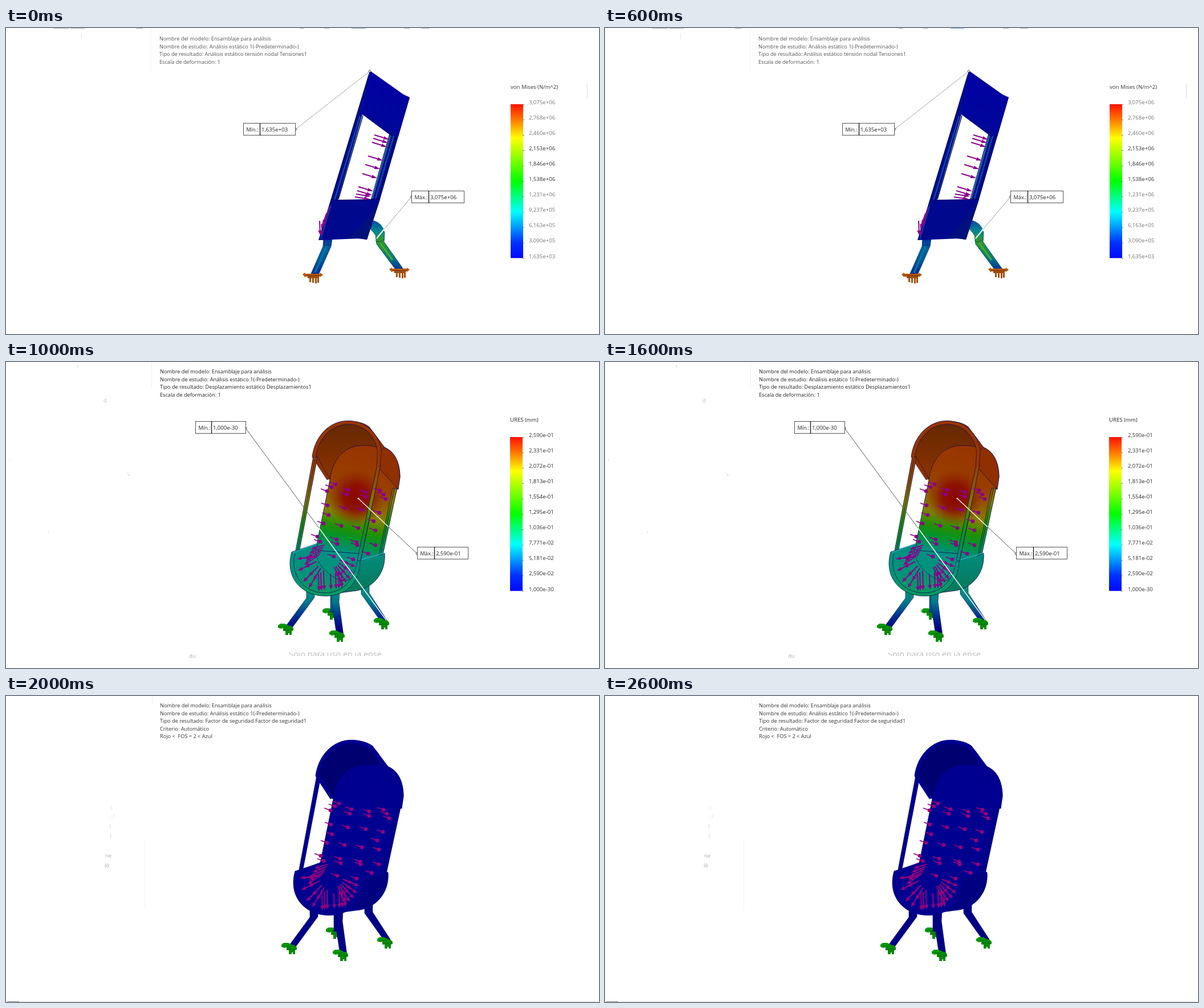
Animation of 1040 by 538 pixels, one loop 3 s. Source, as an HTML page:

```html
<!DOCTYPE html>
<html lang="es">
<head>
<meta charset="utf-8">
<title>Análisis estático</title>
<style>
  html, body { margin: 0; width: 100%; height: 100%; overflow: hidden; background: #fff; }
  svg { display: block; width: 1040px; height: 538px; color: #8c008c; }
  text { font-family: "Open Sans", "Noto Sans", sans-serif; font-size: 9.2px; white-space: pre; }
  .num { font-size: 9.6px; }
</style>
</head>
<body>
<svg id="stage" viewBox="0 0 1040 538"></svg>
<script>
const LOAD = 'currentColor';

const path = (d, fill, stroke = 'none', width = .8) =>
  `<path d="${d}" fill="${fill}" stroke="${stroke}" stroke-width="${width}"/>`;
const line = (x1, y1, x2, y2, color, width = 1, extra = '') =>
  `<line x1="${x1}" y1="${y1}" x2="${x2}" y2="${y2}" stroke="${color}" stroke-width="${width}" ${extra}/>`;
const rect = (x, y, w, h, fill) =>
  `<rect x="${x}" y="${y}" width="${w}" height="${h}" fill="${fill}"/>`;
const text = (x, y, s, fill, cls = '') =>
  `<text x="${x}" y="${y}" fill="${fill}" class="${cls}">${s.replace(/</g, '&lt;')}</text>`;
const stops = list => list.map(([at, color]) =>
  `<stop offset="${at}" stop-color="${color}"/>`).join('');
const gradient = (id, y1, y2, list, x1 = 0, x2 = 0) =>
  `<linearGradient id="${id}" gradientUnits="userSpaceOnUse" x1="${x1}" x2="${x2}" y1="${y1}" y2="${y2}">${stops(list)}</linearGradient>`;

const defs = `<defs>
  <linearGradient id="scale" x2="0" y2="1">${stops([[0, '#ff1000'], [.1, '#ff7800'], [.22, '#ffff00'],
    [.38, '#70ff00'], [.5, '#00ff00'], [.6, '#00ff80'], [.7, '#00ffff'], [.8, '#0098ff'], [.9, '#0030ff'], [1, '#0008ff']])}</linearGradient>
  ${gradient('panel', 147, 335, [[0, '#983400'], [.38, '#984000'], [.53, '#906000'], [.65, '#808000'],
    [.77, '#249000'], [.87, '#009430'], [1, '#008f80']], 634, 592)}
  ${gradient('bar', 165, 345, [[0, '#963600'], [.25, '#8f5000'], [.45, '#807c00'], [.65, '#209000'], [.85, '#009040'], [1, '#008f80']])}
  ${gradient('leg', 402, 472, [[0, '#00907c'], [.3, '#00788c'], [.65, '#002c90'], [1, '#000080']])}
  ${gradient('shell', 335, 405, [[0, '#008c80'], [1, '#087858']])}
  ${gradient('seat', 335, 410, [[0, '#009084'], [.5, '#009478'], [1, '#0a9a60']])}
  ${gradient('inside', 110, 200, [[0, '#662800'], [1, '#8a3200']])}
  ${gradient('plate', 75, 190, [[0, '#0000a4'], [1, '#000898']])}
  ${gradient('bentLeg', 340, 426, [[0, '#0050a0'], [.2, '#008890'], [.38, '#309830'], [.55, '#189048'], [.75, '#007888'], [1, '#002c90']])}
  ${gradient('straightLeg', 368, 434, [[0, '#0028a0'], [.3, '#0060a0'], [.6, '#005898'], [1, '#002890']])}
  <radialGradient id="hot" gradientUnits="userSpaceOnUse" cx="614" cy="238" r="50">
    <stop offset="0" stop-color="#8c0500"/><stop offset=".45" stop-color="#8c0c00" stop-opacity=".9"/>
    <stop offset="1" stop-color="#8c2000" stop-opacity="0"/></radialGradient>
  <clipPath id="cut"><rect x="440" y="511" width="228" height="6"/></clipPath>
</defs>`;

const heading = (x, y, lines, color) =>
  lines.map((s, i) => text(x, y + i * 13.5, s, color)).join('');

function legend(x, y, title, labels, color, faint) {
  const step = 27.05;
  return text(x, y - 27, title, color, 'num') + rect(x, y, 22, 270.5, 'url(#scale)') +
    labels.map((s, i) => line(x + 21, y + .5 + i * step, x + 24, y + .5 + i * step, '#777') +
      text(917, y + i * step, s, i > 2 && i < 6 ? color : faint, 'num')).join('');
}

const callout = (x, y, w, split, name, value) =>
  `<rect x="${x + .5}" y="${y + .5}" width="${w}" height="21" fill="#fff" stroke="#555"/>` +
  line(x + split + .5, y, x + split + .5, y + 22, '#222', 1.4) +
  text(x + 5.5, y + 14.5, name, '#222') + text(x + split + 3, y + 14.5, value, '#222', 'num');

const anchor = (x, y) => `<circle cx="${x}" cy="${y}" r="1.8" fill="#fff" stroke="#555"/>`;

function arrow(x1, y1, x2, y2, half = 3.4, head = 8) {
  const length = Math.hypot(x2 - x1, y2 - y1), ux = (x2 - x1) / length, uy = (y2 - y1) / length;
  const bx = x2 - ux * head, by = y2 - uy * head;
  return line(x1, y1, bx, by, LOAD, 2) +
    path(`M${x2} ${y2}L${bx - uy * half} ${by + ux * half}L${bx + uy * half} ${by - ux * half}Z`, LOAD);
}

// Side view, stress
function sideClamp(x, y) {
  const teeth = [2, 7, 12, 16].map(d => rect(x - 8 + d, y + 5, 3, 11 - d % 3, '#a85008')).join('');
  return path(`M${x - 18} ${y}l5 -3v2h26v-2l5 4l-5 4v-1h-26v2Z`, '#b85c0c') +
    rect(x - 9, y + 2, 20, 5, '#9c4a08') + teeth + line(x - 13, y + 2, x + 14, y + 2, '#743606');
}

function sideChair() {
  const loads = [[646, 188], [644, 194], [642, 201], [635, 225], [630, 240], [625, 256],
    [618, 279], [616, 286], [614, 292], [612, 297]];
  return path('M557 370L572 370L570 384L548 434L535 432L556 384Z', 'url(#straightLeg)', '#003080') +
    line(562, 384, 542, 430, '#0078a0', 3) + path('M556 380Q563 384 571 380', 'none', '#002050') +
    path('M642 338Q660 342 664 360L663 376L697 424L685 427L650 380L648 364L639 353Z', 'url(#bentLeg)', '#004878') +
    line(656, 378, 678, 408, '#50a820', 3) + path('M648 374Q657 379 664 370', 'none', '#104030') +
    path('M638 75L697 117L708 122L656 301L633 372L622 370L548 373Z', '#000c8c') +
    path('M625 152L672 187L640 301L582 302Z', '#fff') +
    path('M638 75L697 117L708 122L688 191L624 151Z', 'url(#plate)') +
    line(636, 83, 568, 314, '#000070') + line(621, 155, 576, 303, '#1058a0', 2) + line(626, 154, 583, 301, '#001060', 1.5) +
    line(674, 189, 642, 300, '#2860a0', 3) + line(680, 190, 648, 300, '#0858a0', 2) + line(684, 192, 653, 300, '#000060') +
    path('M575 302Q612 304 656 300L633 372Q600 364 556 373Z', '#00088e') +
    path('M600 368Q640 335 652 303L656 301L633 372Z', '#00107c') +
    path('M575 302Q612 304 656 300', 'none', '#000058') + line(570, 312, 552, 371, '#104898', 1.5) +
    loads.map(([x, y], i) => arrow(x, y, x + 26, y + (i > 7 ? 4 : 8), 3, 10)).join('') +
    arrow(567, 314, 557, 347) + arrow(562, 326, 553, 353) + arrow(550, 339, 551, 364) + arrow(557, 337, 552, 365) +
    sideClamp(538, 433) + sideClamp(690, 424);
}

// Perspective view, shared by displacement and safety factor
function clamp(x, y) {
  return path(`M${x - 13} ${y - 7}l4 -3h8l6 3v6l-5 1l-4 -2l-4 1l-5 -2Z`, '#0a9a0a') +
    path(`M${x - 4} ${y - 3}l6 -4l8 1l4 4v4l-3 1v7h-4v-3h-2v3h-5v-7h-4Z`, '#088a08') +
    line(x - 10, y - 5, x + 2, y - 4, '#056005', .8) + line(x - 2, y + 1, x + 12, y + 1, '#056005', .8);
}

function perspectiveLoads() {
  const heads = [[578, 215], [571, 220], [563, 227], [600, 225], [597, 233], [631, 229], [631, 237],
    [656, 226], [662, 233], [666, 241], [564, 252], [594, 257], [625, 260], [655, 265], [566, 269],
    [645, 280], [557, 284], [588, 288], [618, 292], [648, 296], [546, 307], [580, 312], [551, 316],
    [581, 320], [615, 317], [616, 322], [648, 322], [635, 337], [575, 342], [609, 347]];
  const tips = [[510, 346], [512, 367], [521, 387], [531, 397], [590, 391], [597, 388], [604, 382], [610, 373], [613, 360]];
  const drops = [548, 552, 557, 569, 578, 583, 588];
  const radial = ([x, y], from, to) => arrow(566 + (x - 566) * from, 340 + (y - 340) * from,
    566 + (x - 566) * to, 340 + (y - 340) * to);
  return heads.map(([x, y]) => line(x - 11, y - 4, x, y, LOAD, 1.8) +
      `<circle cx="${x}" cy="${y}" r="3.3" fill="${LOAD}"/>`).join('') +
    tips.map(tip => radial(tip, .5, 1) + radial(tip, .4, .78)).join('') +
    drops.map((x, i) => arrow(x, 373 - i % 3 * 3, x + 1, 403 - i)).join('') +
    [0, 1, 2, 3, 4].map(i => arrow(558 - i * 2, 322 + i * 4, 535 - i * 3, 329 + i * 7)).join('');
}

function chair(c) {
  const arch = 'M540 167C545 131 570 106.5 600 106.5C630 106.5 651 128 655 157L653 184';
  return clamp(568, 443) + path('M569 405h8l-2 35h-6Z', c.leg, c.edge, .6) +
    path('M623 392L637 390L637 406L668 454L658 457L623 408Z', c.leg, c.edge, .6) +
    path('M618 345L664 336C667 372 642 401 607 403L570 408Z', c.shell, c.edge) +
    path('M600 104C615 104 628 107 637 114L664 150C682 158 691 178 691 202L687 224L652 184Z', c.hood, c.edge) +
    path('M540 167C545 131 570 106 600 106C635 106 654 133 656 156L650 200L567 207Z', c.inside) +
    path('M568 207C573 168 596 147 625 147Q642 146 654 151L652 184L686 222L660 337L618 350L543 330Z', c.panel) +
    (c.hot ? '<circle cx="614" cy="238" r="50" fill="url(#hot)"/>' : '') +
    path('M543 330L568 207C573 168 596 147 625 147Q642 146 654 151', 'none', c.edge) +
    path('M652 184L688 224L691 202Q690 160 663 150L656 158Z', c.hood, c.edge) +
    path('M537 167L545 166L568 205L563 207Z', c.hood, c.edge, .7) +
    path('M539 166L546 168L514 335L507 337Z', c.bar, c.edge) + line(542, 170, 511, 334, c.edge, .7) +
    path('M678 222L686 222L661 338L654 340Z', c.bar, c.edge) + line(681, 223, 657, 339, c.edge, .8) +
    path('M527 400L541 402L541 414L502 467L491 464L527 415Z', c.leg, c.edge, .6) +
    path('M571 404L585 404L584 422L592 481L580 481L571 420Z', c.leg, c.edge, .6) +
    path('M501 334L547 319Q545 326 542 331L621 337L621 350C620 385 600 411.5 560 411.5C520 411.5 488 380 501 334Z', c.seat, c.edge) +
    path('M507 337C497 374 523 406 559 406C594 406 612 379 616 350', 'none', c.edge) +
    path('M542 331Q544 354 566 372Q590 391 604 381', 'none', c.edge, .7) +
    line(503, 335, 546, 319, c.light, 1.5) + line(622, 348, 663, 336, c.light, 1.5) +
    path('M651 181L657 181L622 350L616 349Z', c.bar, c.edge) + line(640, 265, 622, 348, c.edge, .8) +
    path(arch, 'none', c.edge, 7) + path(arch, 'none', c.rim, 5.6) +
    perspectiveLoads() + clamp(490, 470) + clamp(580, 482) + clamp(658, 460);
}

const common = ['Nombre del modelo: Ensamblaje para análisis', 'Nombre de estudio: Análisis estático 1(-Predeterminado-)'];

const stress = [[83, 27], [113, 25], [228, 12], [515, 8], [558, 9], [698, 10], [728, 14]]
    .map(([x, w]) => rect(x, 0, w, 1, '#aaa')).join('') + rect(606, 0, 24, 1, '#6ca4c4') +
  line(132.5, 9, 132.5, 21, '#e4e4e4') + line(254.5, 0, 254.5, 80, '#f5f5f5') + line(1019.5, 98, 1019.5, 124, '#ddd') +
  heading(269, 22.3, [...common, 'Tipo de resultado: Análisis estático tensión nodal Tensiones1', 'Escala de deformación: 1'], '#555') +
  sideChair() +
  line(508, 178, 638, 76, '#777', 1, 'stroke-dasharray="2 1"') + anchor(508, 178) + anchor(638, 76) +
  line(711, 297, 663, 354, '#666', 1, 'stroke-dasharray="2 1"') + line(663, 354, 650, 370, '#fff', 2) + anchor(711, 297) +
  callout(416, 167, 91, 29, 'Mín.:', '1,635e+03') + callout(711, 286, 92, 30, 'Máx.:', '3,075e+06') +
  legend(885, 134, 'von Mises (N/m^2)', ['3,075e+06', '2,768e+06', '2,460e+06', '2,153e+06', '1,846e+06', '1,538e+06',
    '1,231e+06', '9,237e+05', '6,163e+05', '3,090e+05', '1,635e+03'], '#333', '#777');

const displacement = line(255.5, 0, 255.5, 45, '#eee') +
  text(124, 10, '‹', '#aaa') + text(171, 71, 'd', '#bbb') + text(212, 199, '·,', '#999') + text(5, 174, '‹', '#ccc') + text(73, 302, '‹', '#ccc') +
  text(321, 520, 'du', '#aaa') + `<g clip-path="url(#cut)"><text x="496" y="518.5" fill="#bbb" style="font-size:14.4px">Solo para uso en la ense</text></g>` +
  heading(270, 20.3, [...common, 'Tipo de resultado: Desplazamiento estático Desplazamientos1', 'Escala de deformación: 1'], '#222') +
  chair({ hood: '#902f00', inside: 'url(#inside)', rim: '#983400', panel: 'url(#panel)', bar: 'url(#bar)', seat: 'url(#seat)',
    shell: 'url(#shell)', leg: 'url(#leg)', edge: '#101050', light: '#30a8b0', hot: true }) +
  line(420, 116, 549, 292, '#555') + line(549, 292, 667, 454, '#fff', 1.3) + anchor(420, 116) +
  line(721, 337, 671, 290, '#555') + line(671, 290, 618, 240, '#fff', 1.3) + anchor(721, 337) +
  `<circle cx="618" cy="240" r="1.6" fill="#fff"/>` +
  callout(332, 104, 88, 28, 'Mín.:', '1,000e-30') + callout(721, 325, 89, 30, 'Máx.:', '2,590e-01') +
  legend(884, 132, 'URES (mm)', ['2,590e-01', '2,331e-01', '2,072e-01', '1,813e-01', '1,554e-01', '1,295e-01',
    '1,036e-01', '7,771e-02', '5,181e-02', '2,590e-02', '1,000e-30'], '#222', '#333');

const safety = line(256.5, 0, 256.5, 14, '#eee') + line(243.5, 250, 243.5, 375, '#f3f3f3') +
  text(181, 199, '·)', '#ddd') + text(181, 213, '._)', '#ddd') + text(181, 232, ')', '#ccc') + text(179, 249, '-)', '#ccc') +
  text(174, 284, 'ne', '#aaa') + text(173, 301, 'ió', '#99a') +
  rect(2, 537, 1036, 1, '#ddd') + rect(2, 537, 21, 1, '#777') +
  heading(270, 20.3, [...common, 'Tipo de resultado: Factor de seguridad Factor de seguridad1', 'Criterio: Automático', 'Rojo <  FOS = 2 < Azul'], '#333') +
  `<g transform="translate(6 -26)" color="#98007c">${chair({ hood: '#000090', inside: '#000070', rim: '#000090', panel: '#000090', bar: '#00008c',
    seat: '#000090', shell: '#000080', leg: '#000084', edge: '#000080', light: '#000080' })}</g>`;

const stage = document.getElementById('stage');
stage.innerHTML = defs + [stress, displacement, safety].map(s => `<g class="scene">${s}</g>`).join('');
const scenes = [...stage.querySelectorAll('.scene')];

const start = performance.now();
function draw() {
  const current = Math.floor((performance.now() - start) / 1000) % scenes.length;
  scenes.forEach((scene, i) => { scene.style.display = i === current ? '' : 'none'; });
  requestAnimationFrame(draw);
}
draw();
</script>
</body>
</html>
```
